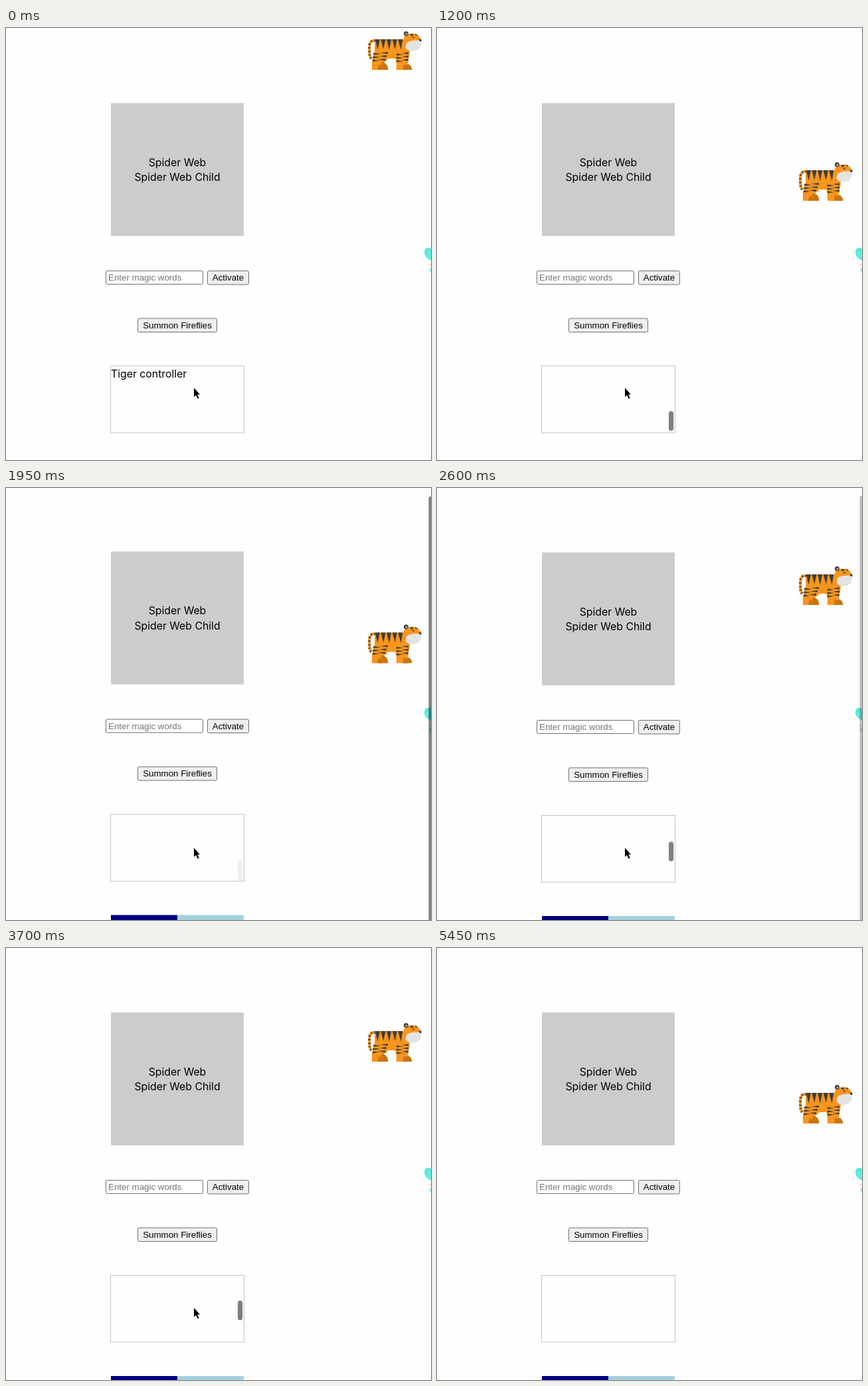
An HTML page with a canvas that plays this animation: 640x650 px, repeating every 5.5 s.

```html
<!DOCTYPE html>
<html lang="en">
<head>
<meta charset="utf-8">
<title>Tiger controller</title>
<style>
html, body { margin: 0; width: 100%; height: 100%; overflow: hidden; background: #fefefe; }
canvas { display: block; }
</style>
</head>
<body>
<canvas id="stage" width="640" height="650"></canvas>
<script>
const ctx = document.getElementById('stage').getContext('2d');
const LOOP = 5500, STEP = 50;
const LABEL = '15.8px Inter, "Noto Sans", sans-serif';
const CONTROL = '13.333px "Liberation Sans", Arial, sans-serif';
const ORANGE = '#f8951d', SHADE = '#c9740f', DARK = '#3d3d3b';

// Each track is a list of [time, value] pairs.
const tigerTop = [[0, 5], [200, 16], [400, 40], [600, 66], [800, 93], [1000, 141],
  [1200, 202], [1300, 205.5], [2200, 205.5], [2400, 176], [2600, 118], [2800, 68],
  [3000, 37], [3100, 37], [3400, 66], [3600, 97], [3700, 113], [4200, 177],
  [4450, 205], [4550, 206]];
const pageScroll = [[1300, 0], [1400, 8], [1600, 24], [1800, 21], [1950, 17.5], [2150, 16]];
const innerBar = [[0, 0], [50, 1], [1700, 1], [1950, 0.12], [2000, 0], [2200, 0],
  [2250, 1], [4850, 1], [5150, 0]];
const pageBar = [[1300, 0], [1350, 1], [2450, 1], [2600, 0.5], [2750, 0]];
const pointerX = [[4550, 283], [4800, 160]];
const pointerY = [[4550, 541.5], [4800, 652]];

// Monotone cubic interpolation: smooth without overshoot.
function at(track, t) {
  const n = track.length - 1;
  if (t <= track[0][0]) return track[0][1];
  if (t >= track[n][0]) return track[n][1];
  let i = 0;
  while (t >= track[i + 1][0]) i++;
  const rate = k => k < 0 || k >= n ? 0
    : (track[k + 1][1] - track[k][1]) / (track[k + 1][0] - track[k][0]);
  const slope = k => {
    const a = rate(k - 1), b = rate(k);
    return a * b > 0 ? 2 * a * b / (a + b) : 0;
  };
  const [t0, v0] = track[i], [t1, v1] = track[i + 1];
  const d = t1 - t0, u = (t - t0) / d, w = 1 - u;
  return v0 * (1 + 2 * u) * w * w + slope(i) * d * u * w * w
    + v1 * u * u * (3 - 2 * u) - slope(i + 1) * d * u * u * w;
}

function rect(x, y, w, h, color) {
  ctx.fillStyle = color;
  ctx.fillRect(x, y, w, h);
}

function pill(x, y, w, h, r, fill, stroke) {
  ctx.beginPath();
  ctx.roundRect(x, y, w, h, r);
  ctx.fillStyle = fill;
  ctx.fill();
  if (stroke) {
    ctx.strokeStyle = stroke;
    ctx.lineWidth = 1;
    ctx.stroke();
  }
}

function text(s, x, y, font, color = '#000', align = 'left') {
  ctx.font = font;
  ctx.fillStyle = color;
  ctx.textAlign = align;
  ctx.fillText(s, x, y);
}

function shape(d, color) {
  ctx.fillStyle = color;
  ctx.fill(new Path2D(d));
}

function dot(x, y, r, color) {
  ctx.fillStyle = color;
  ctx.beginPath();
  ctx.arc(x, y, r, 0, Math.PI * 2);
  ctx.fill();
}

function button(label, x, y, w) {
  pill(x + 0.5, y + 0.5, w - 1, 20.5, 2, '#efefef', '#6f6f6f');
  text(label, x + w / 2, y + 15.2, CONTROL, '#000', 'center');
}

function drawPage(scroll, inner, barAlpha) {
  ctx.save();
  ctx.translate(0, -scroll);
  rect(158, 113, 200, 200, '#ccc');
  text('Spider Web', 258, 207.5, LABEL, '#000', 'center');
  text('Spider Web Child', 258, 230, LABEL, '#000', 'center');

  pill(150.5, 365.5, 146, 20, 2, '#fff', '#6f6f6f');
  text('Enter magic words', 154, 380, CONTROL, '#757575');
  button('Activate', 303, 365, 63);
  button('Summon Fireflies', 198, 436.5, 120);

  rect(158, 660, 100, 100, '#000080');
  rect(258, 660, 100, 100, '#a3d2df');

  ctx.strokeStyle = '#c4c4c4';
  ctx.lineWidth = 1;
  ctx.strokeRect(157.5, 508.5, 201, 100.5);
  ctx.beginPath();
  ctx.rect(158, 509, 200, 100);
  ctx.clip();
  text('Tiger controller', 158, 526 - inner, LABEL);
  pill(349, 510 + inner / 2.96, 7.2, 29.5, 3.6, `rgba(0,0,0,${0.5 * barAlpha})`);
  ctx.restore();
}

function drawButterfly() {
  shape('M640 332Q636 329.5 632 332Q629 336 630.5 341Q633 347 640 349.5Z', '#57ead9');
  ctx.strokeStyle = '#a5f5ea';
  ctx.lineWidth = 0.7;
  ctx.beginPath();
  for (let i = 0; i < 3; i++) {
    ctx.moveTo(632 + i * 2, 342 + i * 2);
    ctx.lineTo(640, 334 + i * 4);
  }
  ctx.stroke();
  ctx.strokeStyle = '#efb98c';
  ctx.lineWidth = 1;
  ctx.stroke(new Path2D('M636 358Q638 355.5 640 356.5'));
  shape('M640 360L637 364Q638 367 640 368Z', '#8eeade');
}

function spike(x, y, len, half) {
  ctx.beginPath();
  ctx.moveTo(x, y - half);
  ctx.lineTo(x + len, y);
  ctx.lineTo(x, y + half);
  ctx.fill();
}

function drawTiger(top) {
  ctx.save();
  ctx.translate(545, top);

  const tail = new Path2D('M13 15C5 12 2 17 2.2 25C2.4 32 1.5 37 5 41');
  ctx.lineWidth = 4;
  ctx.strokeStyle = ORANGE;
  ctx.stroke(tail);
  ctx.strokeStyle = DARK;
  ctx.setLineDash([1.5, 3.8]);
  ctx.lineDashOffset = -7;
  ctx.stroke(tail);
  ctx.setLineDash([]);

  // far legs, then body with near legs
  shape('M18 42H28L24 47Q30 49 30.5 58H18ZM52 40H61L60 49Q66 51 66.5 58H52Z', SHADE);
  shape('M12 12H56L63 28Q63 38 60 44V50Q57 49 57 58H43V47L41 41H30Q29 45 22 47L19 50'
    + 'Q22 52 22 58H6V47L8 37Q11 33 10 20Z', ORANGE);
  shape('M16 50Q22 51 22 58H14ZM54 49Q61 52 61 58H53Z', SHADE);

  ctx.fillStyle = DARK;
  for (let i = 0; i < 5; i++) {
    const x = 14 + i * 8.6;
    ctx.beginPath();
    ctx.moveTo(x - 3, 12);
    ctx.lineTo(x + 4, 12);
    ctx.lineTo(x + 0.5 + i * 0.2, 28 - (i % 2));
    ctx.fill();
  }
  for (let i = 0; i < 3; i++) {
    const y = 34 + i * 5;
    spike(8 - i * 0.5, y, 12 - i, 1.6);
    spike(30 - i * 2, y - 1.5, -11, 1.6);
    spike(43, y + 1, 10, 1.5);
    spike(61, y - 1, -10, 1.6);
  }

  shape('M54 10Q57 4 65 3.5H72Q77 6 80 12V19L74 28H62L54 23Z', ORANGE);
  shape('M80 14Q69 12.5 60 16Q56 20 57 25Q61 31 69 29.5Q79 28 80 20Z', '#e3e3e3');
  shape('M76.5 11.5L80.5 12V15L78 15Z', DARK);
  shape('M63 4H69L66 8ZM71 4L75 5.5L72 7Z', DARK);
  dot(57.5, 3.6, 3.5, DARK);
  dot(58, 4, 1.8, '#b4a28e');
  dot(68.5, 9.2, 1.2, DARK);
  ctx.restore();
}

function drawPointer(x, y) {
  ctx.save();
  ctx.translate(x, y);
  const arrow = new Path2D('M0 0V13.5L3 10.7L5.5 16.2L7.7 15.2L5.3 9.9H9Z');
  ctx.strokeStyle = '#fff';
  ctx.lineWidth = 1.8;
  ctx.stroke(arrow);
  ctx.fillStyle = '#000';
  ctx.fill(arrow);
  ctx.restore();
}

function draw(t) {
  const top = at(tigerTop, t), scroll = at(pageScroll, t), bar = at(pageBar, t);
  rect(0, 0, 640, 650, '#fefefe');
  drawPage(scroll, top - 5, at(innerBar, t));
  drawButterfly();
  drawTiger(top);
  if (bar > 0) pill(636.5, 2 + scroll * 0.6, 7, 660, 3.5, `rgba(0,0,0,${0.5 * bar})`);
  if (t < 4800) drawPointer(at(pointerX, t), at(pointerY, t));
}

const start = performance.now();
function tick() {
  const t = (performance.now() - start) % LOOP;
  draw(Math.floor(t / STEP) * STEP);
  requestAnimationFrame(tick);
}
tick();
</script>
</body>
</html>
```
